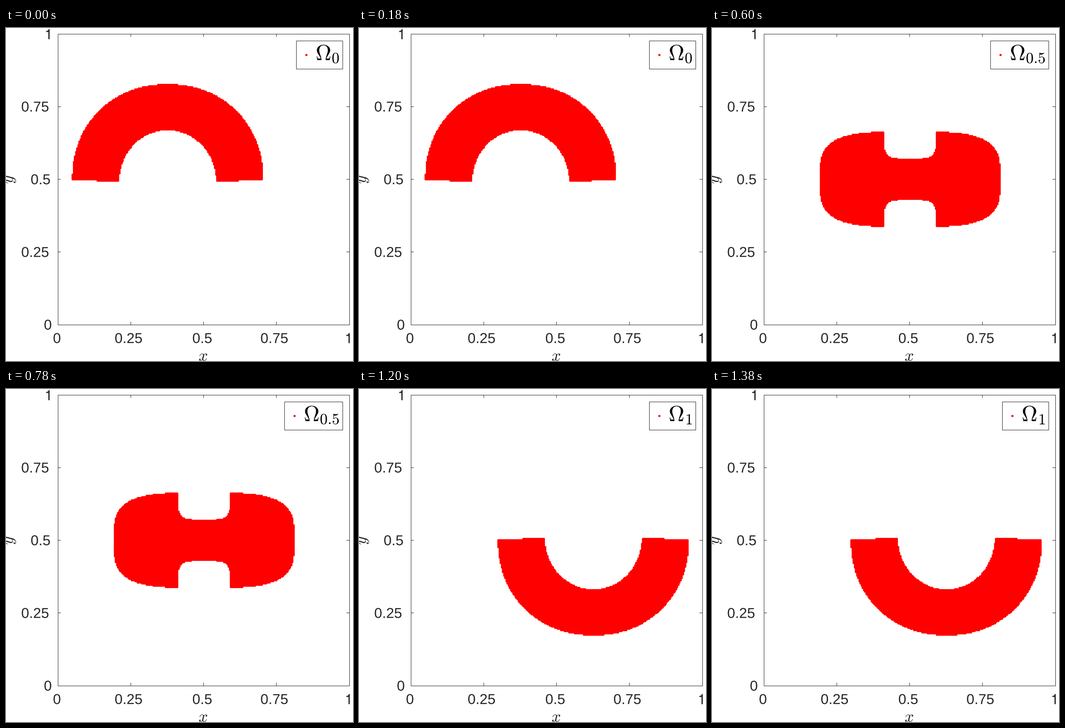
Write a matplotlib script that moves like this. It is 763 px wide and 734 px high and loops after 1.5 s.

```python
import numpy as np
import matplotlib.pyplot as plt
from matplotlib.animation import ArtistAnimation
from matplotlib.patches import PathPatch, Polygon, Rectangle
from matplotlib.path import Path
from matplotlib.textpath import TextPath

W, H, DPI = 763, 734, 64
LEFT, TOP, SIDE = 113.5, 12.5, 641   # plot box in pixels
CELLS = 256                          # particle grid per side
DOT = 4.9
STEPS = 5
INK = "#262626"

fig = plt.figure(figsize=(W / DPI, H / DPI), dpi=DPI, facecolor="white")
ax = fig.add_axes([0, 0, 1, 1])
ax.set(xlim=(0, W), ylim=(H, 0))
ax.axis("off")


def pt(px):
    return px * 72 / DPI


def text(s, x, y, size, h=0.5, v=0.5, color=INK, upright=True):
    """Place text by its ink box; h and v are the anchor fractions."""
    path = TextPath((0, 0), s, size=size,
                    prop=dict(family="Liberation Sans", math_fontfamily="cm"))
    p = path.vertices
    p = p * [1, -1] if upright else -p[:, ::-1]
    box = Path(p, path.codes).get_extents()
    p = p + [x - box.x0 - h * box.width, y - box.y0 - v * box.height]
    return ax.add_patch(PathPatch(Path(p, path.codes), fc=color, lw=0))


def plain_one(x, y, size):
    """A numeral one without a foot."""
    p = np.array([(259, 0), (259, 505), (102, 505), (102, 568), (190, 585),
                  (250, 625), (285, 709), (347, 709), (347, 0)])
    p = (p - [224, 354]) * [size / 1000, -size / 1000]
    ax.add_patch(Polygon(p + [x, y], fc=INK, lw=0))


def line(xs, ys):
    ax.plot(xs, ys, color=INK, lw=pt(1), solid_capstyle="butt")


def frame(x, y, w, h):
    return ax.add_patch(Rectangle((x, y), w, h, fill=False, ec=INK, lw=pt(1)))


def draw_axes():
    right, bottom, tick = LEFT + SIDE, TOP + SIDE, 6.5
    frame(LEFT, TOP, SIDE, SIDE)
    for k in (1, 2, 3):
        x, y = LEFT + SIDE * k / 4, TOP + SIDE * k / 4
        line([x, x], [TOP, TOP + tick])
        line([x, x], [bottom - tick, bottom])
        line([LEFT, LEFT + tick], [y, y])
        line([right - tick, right], [y, y])

    xs = (112, 269.5, 431.5, 590)
    ys = (92, 64, 76, 64)
    for k in range(4):
        text(f"{k / 4:g}", xs[k], 683.5, 31.5)
        text(f"{k / 4:g}", ys[k], bottom + 0.5 - SIDE * k / 4, 31.5)
    plain_one(752, 683.5, 31.5)
    plain_one(92, 13.5, 31.5)
    text("$x$", 433.5, 725.5, 36)
    text("$y$", 10.5, 334, 36, upright=False)


def arc(q, n):
    """Unit superellipse of power n."""
    return (1 - np.clip(q, 0, 1) ** n) ** (1 / n)


def edge(u, half, s):
    """Height of the rim above the middle: a sinking dome with a growing bite."""
    u = np.abs(u)
    peak = 210 * (1 - s) + 4 * s ** 3
    rim = peak * arc(u / half, 2.1 + 2.9 * s)
    if s > 0:
        mouth, floor = 106 * s ** 0.9, 200 - 308 * s
        bite = peak - (peak - floor) * arc(u / mouth, 2 / s ** 1.3)
        rim = np.where(u < mouth, np.minimum(rim, bite), rim)
    return rim


def inside(p, t):
    """The lower rim runs the upper rim's motion backwards."""
    u = p[:, 0] - (355 + 160 * t)
    v = 333 - p[:, 1]
    half = 199 + 11.5 * (2 * t - 1) ** 2
    return ((np.abs(u) <= half)
            & (v <= edge(u, half, t)) & (-v <= edge(u, half, 1 - t)))


gx, gy = np.meshgrid(np.arange(CELLS + 1), np.arange(CELLS + 1))
GRID = np.c_[gx.ravel(), gy.ravel()] * SIDE / CELLS + [LEFT, TOP]


def particles(t, inset=1.3):
    """Grid nodes lying inside the shape by at least the inset."""
    keep = np.ones(len(GRID), bool)
    for a in np.arange(8) * np.pi / 4:
        keep &= inside(GRID + inset * np.array([np.cos(a), np.sin(a)]), t)
    return GRID[keep]


def dots(x, y):
    return ax.plot(x, y, "o", color="red", ms=pt(DOT), mew=0)[0]


def scene(t):
    """Particle cloud and its legend, sized by the length of the time."""
    time = f"{t:g}"
    left = {1: 637.5, 3: 611.5, 4: 595.5}[len(time)]
    return [
        dots(*particles(t).T),
        frame(left, 27.5, 739.5 - left, 62),
        dots([left + 22.5], [58.5]),
        text(r"$\Omega$", left + 45.5, 70.7, 48, h=0, v=1, color="black"),
        text(f"${time}$", 731.8, 78, 34, h=1, v=1, color="black"),
    ]


draw_axes()
scenes = [scene(t) for t in np.linspace(0, 1, STEPS)]
anim = ArtistAnimation(fig, scenes, interval=300, repeat=True, repeat_delay=0)
plt.show()
```
